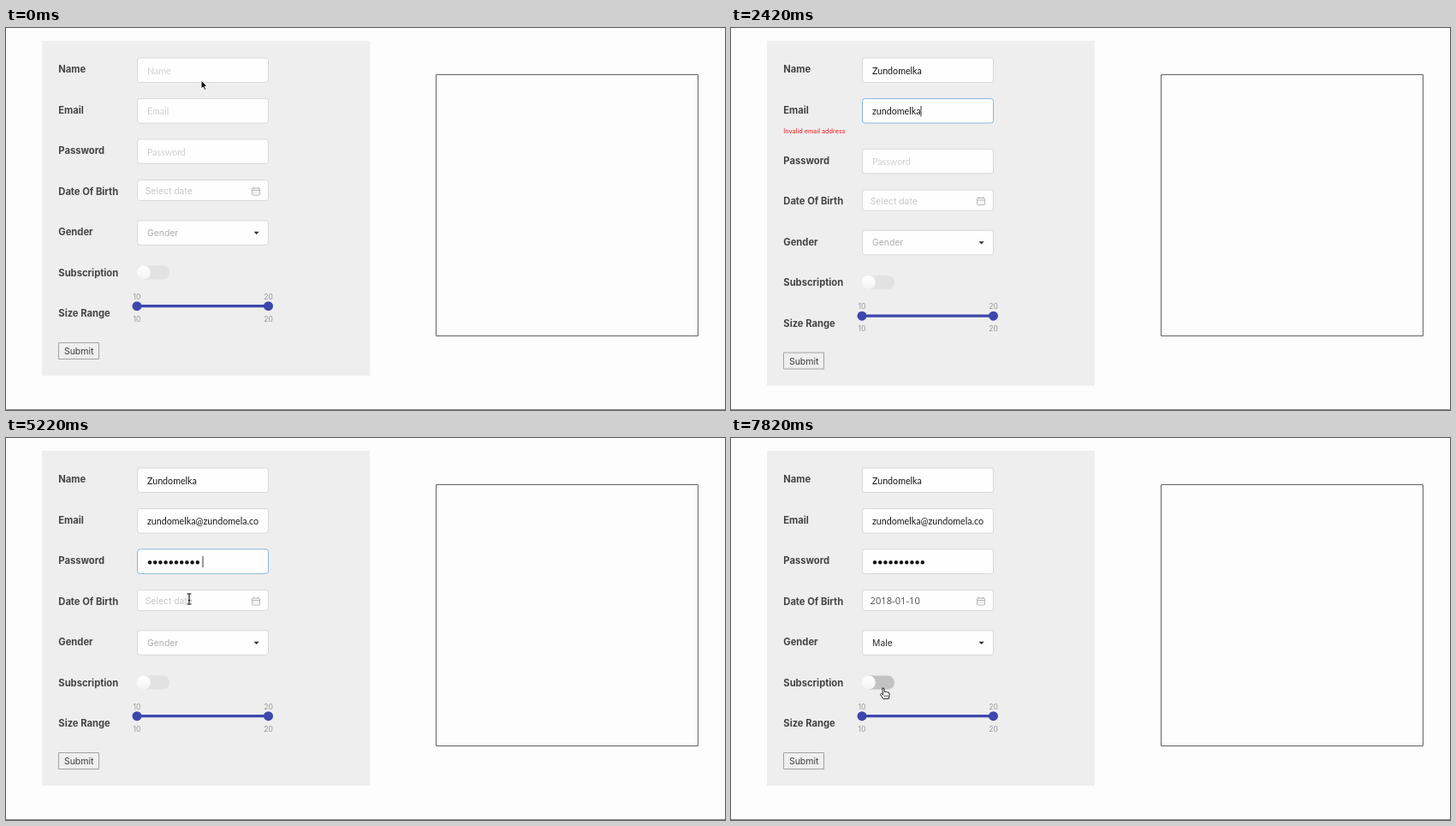
These frames come from a looping animation (840 by 446 pixels, 8000 ms). An HTML page with a canvas:

```html
<!DOCTYPE html>
<html lang="en">
<head>
<meta charset="utf-8">
<title>Form demo</title>
<style>
html, body { margin: 0; width: 100%; height: 100%; overflow: hidden; background: #fdfdfd; }
canvas { display: block; width: 840px; height: 446px; }
</style>
</head>
<body>
<canvas id="stage"></canvas>
<script>
const LOOP = 8000;
const W = 840, H = 446;
const canvas = document.getElementById('stage');
const ratio = window.devicePixelRatio || 1;
canvas.width = W * ratio;
canvas.height = H * ratio;
const ctx = canvas.getContext('2d');
ctx.scale(ratio, ratio);

const LABEL = '700 11.2px Inter, sans-serif';
const FIELD = '10.7px Lato, sans-serif';
const UI = '10.4px Inter, sans-serif';
const CAL = '11.2px "Open Sans", sans-serif';
const DAY = '10.8px "Open Sans", sans-serif';
const BLUE = '#1683fb', INDIGO = '#3c47ac', FOCUS = '#85b7d9';

const NAME = 'Zundomelka';
const EMAIL = 'zundomelka@zundomela.com';
const DATE = '2018-01-10';

// Pointer by step: first step, last step, kind, start x, y, end x, y
const POINTER = [
  [0, 0, 'arrow', 228, 61, 228, 61],
  [1, 3, 'beam', 215, 58, 189.5, 52],
  [20, 22, 'beam', 203, 122, 203, 143],
  [26, 27, 'beam', 214, 188, 214, 190],
  [28, 30, 'hand', 240, 244, 258, 290],
  [31, 32, 'hand', 300, 354, 344, 417],
  [33, 34, 'arrow', 322, 372, 272, 292],
  [35, 37, 'hand', 240, 238, 222, 240],
  [38, 39, 'hand', 198, 268, 178, 292]
];

function text(str, x, y, font, color, align = 'left') {
  ctx.font = font;
  ctx.fillStyle = color;
  ctx.textAlign = align;
  ctx.fillText(str, x, y);
}

function box(x, y, w, h, r, fill, stroke) {
  ctx.beginPath();
  ctx.roundRect(x, y, w, h, r);
  if (fill) { ctx.fillStyle = fill; ctx.fill(); }
  if (stroke) { ctx.strokeStyle = stroke; ctx.lineWidth = 1; ctx.stroke(); }
}

function line(x1, y1, x2, y2, color, width = 1) {
  ctx.beginPath();
  ctx.moveTo(x1, y1);
  ctx.lineTo(x2, y2);
  ctx.strokeStyle = color;
  ctx.lineWidth = width;
  ctx.stroke();
}

function disc(x, y, r, fill) {
  ctx.beginPath();
  ctx.arc(x, y, r, 0, Math.PI * 2);
  ctx.fillStyle = fill;
  ctx.fill();
}

function shape(points, fill, stroke) {
  ctx.beginPath();
  points.forEach(([x, y]) => ctx.lineTo(x, y));
  ctx.closePath();
  ctx.fillStyle = fill;
  ctx.fill();
  if (stroke) { ctx.strokeStyle = stroke; ctx.lineWidth = 1; ctx.stroke(); }
}

// Characters typed between two steps
function typed(step, from, to, start, end) {
  const p = Math.min(1, Math.max(0, (step - from) / (to - from)));
  return Math.round(start + (end - start) * p);
}

function stateAt(step) {
  const emailChars = step < 9 ? 0 : step <= 12
    ? typed(step, 9, 12, 2, 10)
    : typed(step, 12, 18, 10, EMAIL.length);
  return {
    step,
    focus: step < 2 ? '' : step < 8 ? 'name' : step < 22 ? 'email'
      : step < 27 ? 'password' : step >= 35 && step < 38 ? 'gender' : '',
    name: NAME.slice(0, step < 4 ? 0 : typed(step, 4, 7, 2, 10)),
    email: EMAIL.slice(0, emailChars),
    error: emailChars > 0 && emailChars < 23,
    dots: step < 23 ? 0 : typed(step, 23, 25, 4, 10),
    popup: step >= 27 && step < 33,
    date: step >= 30,
    male: step >= 37,
    hover: step >= 39,
    caret: step !== 8
  };
}

function input(y, hint, value, focused, caret) {
  box(153.5, y, 153, 28.5, 3, '#fefefe', focused ? FOCUS : '#d8d8d9');
  ctx.save();
  ctx.beginPath();
  ctx.rect(164.5, y, 130.5, 28.5);
  ctx.clip();
  ctx.font = FIELD;
  const width = ctx.measureText(value).width;
  const x = 165 - (focused ? Math.max(0, width - 129) : 0);
  if (value) text(value, x, y + 18.8, FIELD, '#151515');
  else text(hint, x, y + 18.8, FIELD, focused ? '#a9a9a9' : '#d0d0d0');
  if (focused && caret) line(x + width + .5, y + 8.5, x + width + .5, y + 21, '#333');
  if (focused && value === EMAIL) {
    const end = x + ctx.measureText(EMAIL.split('.')[0]).width;
    ctx.setLineDash([1.5, 1.2]);
    line(165, y + 20.2, end, y + 20.2, '#e5392f', 1.5);
    ctx.setLineDash([]);
  }
  ctx.restore();
}

function passwordDots(y, count) {
  for (let i = 0; i < count; i++) disc(168 + i * 6.2, y, 2.2, '#151515');
}

function calendarIcon(x, y) {
  box(x + .5, y + 1.5, 9, 8, 1, null, '#b4b4b4');
  line(x + .5, y + 4, x + 9.5, y + 4, '#b4b4b4');
  [2.5, 7.5].forEach(d => line(x + d, y, x + d, y + 2.5, '#b4b4b4'));
  [2.5, 5, 7.5].forEach(d => line(x + d - .5, y + 7, x + d + .5, y + 7, '#c4c4c4'));
}

function toggle(y, dark) {
  box(153, y - 8, 38, 16, 8, dark ? '#c2c2c2' : '#e2e2e2');
  const shade = ctx.createLinearGradient(0, y - 8, 0, y + 8);
  shade.addColorStop(0, '#fff');
  shade.addColorStop(1, '#f3f3f3');
  disc(160.8, y, 8, shade);
}

function slider(y) {
  line(153, y, 306.5, y, INDIGO, 3.2);
  [[153, '10'], [306.5, '20']].forEach(([x, label]) => {
    disc(x, y, 5.5, INDIGO);
    text(label, x, y - 8.2, '8.6px Inter, sans-serif', '#969696', 'center');
    text(label, x, y + 17.8, '8.6px Inter, sans-serif', '#969696', 'center');
  });
}

function form(s) {
  const dy = s.error ? 11.5 : 0;
  ctx.fillStyle = '#eee';
  ctx.fillRect(42, 15, 383, 391 + dy);

  ['Name', 'Email', 'Password', 'Date Of Birth', 'Gender', 'Subscription', 'Size Range']
    .forEach((label, i) => text(label, 61.3, 52.2 + i * 47.5 + (i > 1 ? dy : 0), LABEL, '#434343'));

  input(35, 'Name', s.name, s.focus === 'name', s.caret);
  input(82.5, 'Email', s.email, s.focus === 'email', s.caret);
  if (s.error) text('Invalid email address', 61.3, 122.5, '7.3px Inter, sans-serif', '#f01818');

  ctx.save();
  ctx.translate(0, dy);
  const typing = s.focus === 'password';
  input(129.8, s.dots ? '' : 'Password', '', typing, s.caret && !s.dots);
  passwordDots(145.2, s.dots);
  if (typing && s.dots) line(168 + s.dots * 6.2, 138, 168 + s.dots * 6.2, 151, '#333');

  box(153.5, 177.5, 153, 24, 3, '#fefefe', '#d9d9d9');
  if (s.date) text(DATE, 162.5, 194, CAL, '#505050');
  else text('Select date', 162.7, 194, UI, '#c6c6c6');
  calendarIcon(287, 185.5);

  box(153.5, 224.8, 153, 28.5, 3, '#fefefe', s.focus === 'gender' ? FOCUS : '#d8d8d9');
  text(s.male ? 'Male' : 'Gender', 165, 242.8, UI, s.male ? '#2c2c2c' : '#adadad');
  shape([[289.5, 237.7], [295.7, 237.7], [292.6, 241]], '#303030');

  toggle(285.5, s.hover);
  slider(324.7);
  box(61.5, 367.5, 47, 19, 0, '#efefef', '#a2a2a2');
  text('Submit', 85.2, 381, '10.5px Inter, sans-serif', '#3c3c3c', 'center');
  ctx.restore();
}

function popup(s) {
  ctx.save();
  ctx.shadowColor = 'rgba(0,0,0,.24)';
  ctx.shadowBlur = 5;
  ctx.shadowOffsetY = 1;
  box(153, 174.5, 215, 261.5, 3, '#fff');
  ctx.restore();
  [201.5, 231.5, 405.5].forEach(y => line(153, y, 368, y, '#e8e8e8'));

  if (s.date) text(DATE, 162.5, 193, CAL, '#505050');
  else text('Select date', 162.7, 193, UI, '#c6c6c6');
  [['«', 166.5], ['‹', 182], ['›', 339], ['»', 354.5]]
    .forEach(([mark, x]) => text(mark, x, 220.5, '12px "Open Sans", sans-serif', '#505050', 'center'));
  text('Jan 2018', 261, 221, '11.4px "Open Sans", sans-serif', '#4a4a4a', 'center');

  const colX = c => 177 + c * 27.75;
  ['Su', 'Mo', 'Tu', 'We', 'Th', 'Fr', 'Sa']
    .forEach((d, c) => text(d, colX(c), 254, DAY, '#555', 'center'));

  for (let i = 0; i < 42; i++) {
    const x = colX(i % 7), y = 272.8 + Math.floor(i / 7) * 23;
    const inMonth = i > 0 && i < 32;
    const day = i === 0 ? 31 : inMonth ? i : i - 31;
    const picked = i === 10 && s.date;
    const today = i === 20;
    if (picked) box(x - 9.5, y - 9.3, 18.5, 18.5, 2, BLUE);
    if (today) box(x - 8.5, y - 8.8, 18, 17.5, 1, null, '#3493e8');
    const color = picked ? '#fff' : today ? '#1b88e8' : inMonth ? '#444' : '#bdbdbd';
    text(day, x, y + 4, (today ? '700 ' : '') + DAY, color, 'center');
  }

  text('Now', 163, 425, CAL, '#484848');
  text('Select time', 267, 425, '11.3px "Open Sans", sans-serif', s.date ? '#484848' : '#bdbdbd');
  box(332, 411.5, 26, 18.5, 3, s.date ? BLUE : '#f2f2f2');
  text('Ok', 345, 425, CAL, s.date ? '#173c6c' : '#bdbdbd', 'center');
}

const drawPointer = {
  arrow() {
    shape([[0, 0], [0, 10], [2.3, 8], [4, 11.6], [5.7, 10.8], [4.1, 7.3], [7, 7.1]], '#111', '#fff');
  },
  beam() {
    [['#fff', 2.6], ['#1c1c1c', 1.2]].forEach(([color, width]) => {
      line(0, -5.5, 0, 5.5, color, width);
      line(-2.4, -6, 2.4, -6, color, width);
      line(-2.4, 6, 2.4, 6, color, width);
      line(-1.3, 1.5, 1.3, 1.5, color, width);
    });
  },
  hand() {
    shape([[-1.2, 0], [.7, 0], [1.4, 4.6], [3.2, 4], [4.6, 5], [6.3, 5.1], [7.2, 7],
      [6.3, 12.4], [0, 12.6], [-3.6, 7.4], [-2.5, 6.3], [-.5, 7.8]], '#fff', '#222');
    [1.2, 3, 4.8].forEach(x => line(x, 8, x, 10.8, '#333', .7));
  }
};

function pointer(step) {
  const leg = POINTER.find(p => step >= p[0] && step <= p[1]);
  if (!leg) return;
  const [from, to, kind, x1, y1, x2, y2] = leg;
  const p = to > from ? (step - from) / (to - from) : 1;
  const ease = 1 - (1 - p) ** 2;
  ctx.save();
  ctx.translate(x1 + (x2 - x1) * ease, y1 + (y2 - y1) * ease);
  drawPointer[kind]();
  ctx.restore();
}

function draw(time) {
  const step = Math.max(0, Math.floor((time - 20) / 200));
  const s = stateAt(step);
  ctx.fillStyle = '#fdfdfd';
  ctx.fillRect(0, 0, W, H);
  box(502.5, 54.5, 306, 305, 0, null, '#626262');
  form(s);
  line(0, 445.5, W, 445.5, '#858585');
  if (s.popup) popup(s);
  pointer(step);
}

const start = performance.now();
function tick() {
  draw((performance.now() - start) % LOOP);
  requestAnimationFrame(tick);
}
tick();
</script>
</body>
</html>
```
